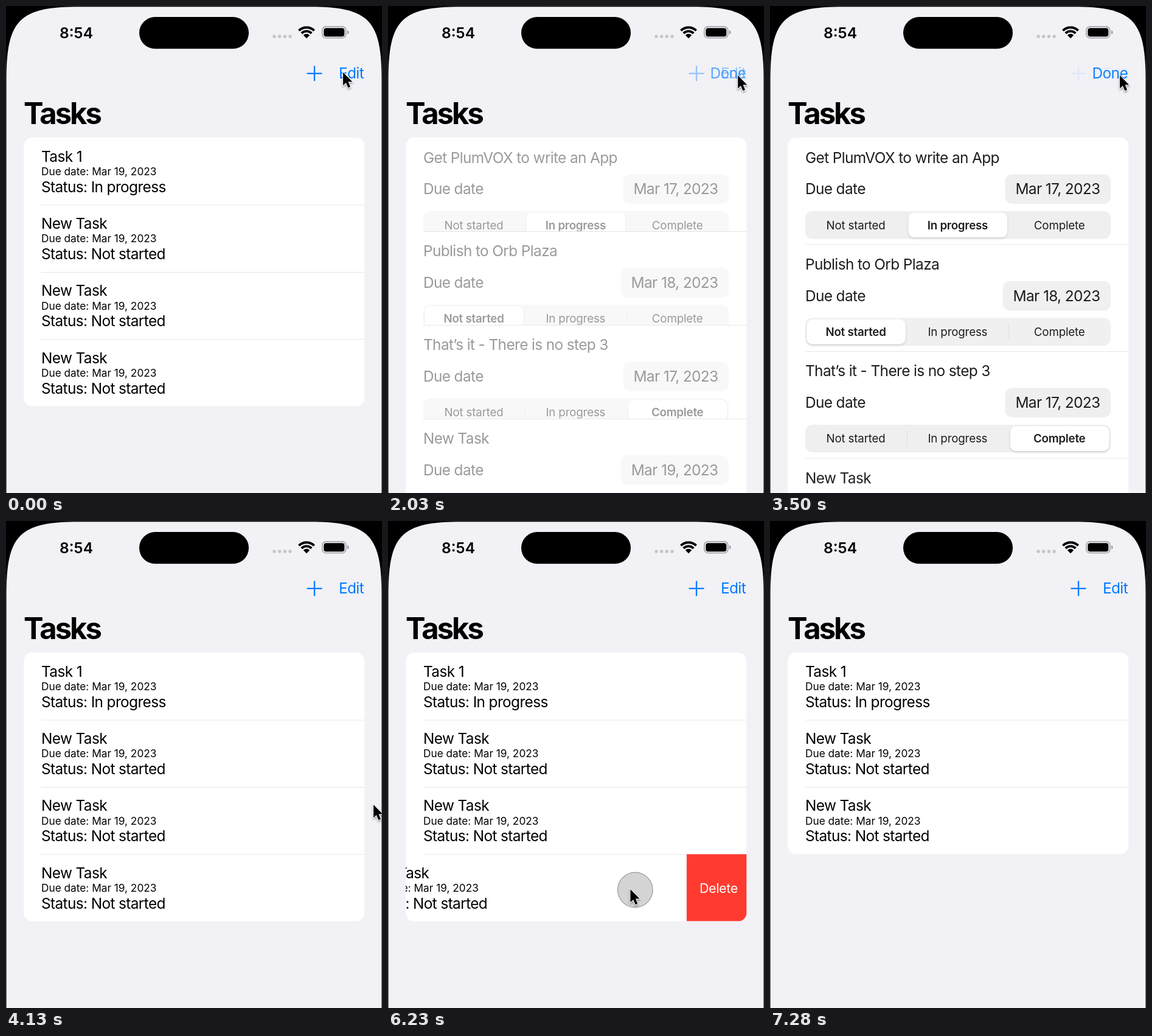
An HTML page for the animation above (8000 ms loop, 618 by 800 pixels).

```html
<!DOCTYPE html>
<html lang="en">
<head>
<meta charset="utf-8">
<title>Tasks</title>
<style>
  html, body { margin: 0; width: 100%; height: 100%; overflow: hidden; background: #000; }
  svg { display: block; }
  text { font-family: Inter, Roboto, sans-serif; fill: #000; white-space: pre; }
  .body { font-size: 24.4px; letter-spacing: -.62px; }
  .note { font-size: 17.25px; }
  .seg { font-size: 18.7px; letter-spacing: -.15px; text-anchor: middle; }
  .on { font-weight: 570; letter-spacing: -.2px; }
  .big { font-size: 48.9px; font-weight: 700; letter-spacing: -2.9px; }
  .time { font-size: 24.6px; font-weight: 600; }
  .blue { fill: #007aff; }
  .end { text-anchor: end; }
  .del { font-size: 21.4px; letter-spacing: -.3px; fill: #fff; }
</style>
</head>
<body>
<svg id="stage" width="618" height="800" viewBox="0 0 618 800"></svg>
<script>
const LOOP = 8000, TOP = 216, LEFT = 29, WIDTH = 560.5;
const SHORT = 110.4, TALL = 180.3;

const states = ['Not started', 'In progress', 'Complete'];
const tasks = [
  { title: 'Get PlumVOX to write an App', day: 17, sel: 1 },
  { title: 'Publish to Orb Plaza', day: 18, sel: 0 },
  { title: 'That’s it - There is no step 3', day: 17, sel: 2 },
  { title: 'New Task', day: 19, sel: 0 }
];

const text = (x, y, cls, s) => `<text x="${x}" y="${y}" class="${cls}">${s}</text>`;
const box = (x, y, w, h, r, fill, more = '') =>
  `<rect x="${x}" y="${y}" width="${w}" height="${h}" rx="${r}" fill="${fill}" ${more}/>`;

const readView = i => text(29, 39.5, 'body', i ? 'New Task' : 'Task 1')
  + text(29, 61.8, 'note', 'Due date: Mar 19, 2023')
  + text(29, 89.6, 'body', 'Status: ' + states[i ? 0 : 1]);

function picker(sel) {
  const w = 502 / 3;
  let out = box(29, 121, 502, 45.5, 11.5, '#eeeeef');
  for (const i of [1, 2])
    if (sel !== i && sel !== i - 1) out += box(28.5 + i * w, 130, 1, 27, 0, '#dadadd');
  out += box(31.4 + sel * w, 123.4, w - 5.2, 40.7, 9.5, '#fff', 'filter="url(#lift)"');
  states.forEach((s, i) => {
    out += text(29 + (i + .5) * w - .6, 150.6, i === sel ? 'seg on' : 'seg', s);
  });
  return out;
}

const editView = d => text(29, 41.6, 'body', d.title)
  + text(29, 93.4, 'body', 'Due date')
  + box(0, 60.5, 0, 48.5, 11.5, '#eeeeef', 'class="pill"')
  + text(513.5, 93.4, 'body end', `Mar ${d.day}, 2023`)
  + picker(d.sel);

const row = (d, i) => `<svg id="row${i}" x="${LEFT}" width="${WIDTH}">
  <g id="read${i}">${readView(i)}</g><g id="edit${i}">${editView(d)}</g>
  ${i ? box(29, 0, 532, 1, 0, '#e0e0e2') : ''}
  ${i === 3 ? `<g id="del">${box(0, 0, WIDTH, SHORT + 1, 0, '#ff3b30')}${text(21, 63.8, 'del', 'Delete')}</g>` : ''}
</svg>`;

// Each smooth corner is one cubic spanning `span`, pulled towards the corner by `pull`
function screenPath(span, pull) {
  const l = .6, r = 617.4, t = 1.2;
  return `M${l} 800V${t + span}C${l} ${t + pull} ${l + pull} ${t} ${l + span} ${t}`
    + `H${r - span}C${r - pull} ${t} ${r} ${t + pull} ${r} ${t + span}V800Z`;
}

function wifiArc(r) {
  const d = r * Math.SQRT1_2;
  return `<path d="M${494 - d} ${53 - d}A${r} ${r} 0 0 1 ${494 + d} ${53 - d}" fill="none" stroke="#000" stroke-width="3.9"/>`;
}

const dots = [0, 1, 2, 3].map(i => `<circle cx="${441 + i * 8.67}" cy="50" r="2.7" fill="#c5c5c9"/>`);
const statusBar = text(88, 52.8, 'time', '8:54')
  + box(219, 18, 180, 52.3, 26.1, '#000')
  + dots.join('') + wifiArc(17.8) + wifiArc(11.6)
  + '<path d="M494 53.2L488.8 48A7.4 7.4 0 0 1 499.2 48Z"/>'
  + box(519.8, 33.8, 39, 18.8, 6.3, 'none', 'stroke="#9c9ca0" stroke-width="1.5"')
  + box(522.3, 36.2, 34, 14, 4, '#000')
  + '<path d="M561 39.8Q563.6 41 563.6 43.2T561 46.6Z" fill="#9c9ca0"/>';

const stage = document.getElementById('stage');
stage.innerHTML = `<defs>
  <clipPath id="round"><rect id="clip" x="${LEFT}" y="${TOP}" width="${WIDTH}" rx="14.4"/></clipPath>
  <filter id="lift" x="-10%" y="-20%" width="120%" height="150%">
    <feDropShadow dx="0" dy="2" stdDeviation="2.2" flood-opacity=".16"/></filter>
  <filter id="shade" x="-50%" y="-50%" width="200%" height="200%">
    <feDropShadow dx="0" dy="2" stdDeviation="1.4" flood-opacity=".4"/></filter>
</defs>
<path d="${screenPath(121, 21)}" fill="#f1f1f6"/>
${statusBar}
<g id="barRead"><path d="M494.6 110.8H519.4M507 98.4V123.2" stroke="#007aff" stroke-width="2.3"/>
${text(588, 119.4, 'body blue end', 'Edit')}</g>
<g id="barEdit">${text(588, 119.4, 'body blue end', 'Done')}</g>
${text(29, 194, 'big', 'Tasks')}
<g clip-path="url(#round)"><rect id="card" x="${LEFT}" y="${TOP}" width="${WIDTH}" fill="#fff"/>${tasks.map(row).join('')}</g>
<circle id="touch" r="28.8" fill="#000" fill-opacity=".17" stroke="#000" stroke-opacity=".35" stroke-width="1.2"/>
<path id="cursor" d="M1 1V22.5L5.8 18L9.3 26.3L13 24.7L9.6 16.6H16.3Z" stroke="#fff" stroke-width="1.8" paint-order="stroke" filter="url(#shade)"/>`;

const el = Object.fromEntries([...stage.querySelectorAll('[id]')].map(e => [e.id, e]));

// Date pills hug their label
for (const pill of stage.querySelectorAll('.pill')) {
  const w = pill.nextElementSibling.getComputedTextLength() + 34.5;
  pill.setAttribute('width', w);
  pill.setAttribute('x', 531 - w);
}

const SWIPE = 5880;
const moves = [
  { from: 0, to: 1400, x: 574, y: 113 },
  { from: 3990, to: 4130, x: 603, y: 465 },
  { from: 4130, to: 4550, x: 602, y: 640 },
  { from: 4690, to: 5250, x: 548, y: 604 }
];
const presses = [[1580, 1740], [3250, 3420], [SWIPE, 6560]];

const ramp = (t, from, to) => {
  const p = Math.min(1, Math.max(0, (t - from) / (to - from)));
  return p * p * (3 - 2 * p);
};
const swipe = (t, power) => Math.pow(Math.max(0, t - SWIPE) / 350, power);

function pointer(t) {
  let x = 553, y = 108;
  for (const m of moves) {
    const p = ramp(t, m.from, m.to);
    x += (m.x - x) * p;
    y += (m.y - y) * p;
  }
  return [x - 150 * swipe(t, 1.5), y];
}

const fade = (e, v) => e.setAttribute('opacity', v.toFixed(3));
const move = (e, x, y) => e.setAttribute('transform', `translate(${x.toFixed(2)} ${y.toFixed(2)})`);

function draw(t) {
  const open = ramp(t, 1740, 2240) - ramp(t, 3420, 3920);
  const gone = ramp(t, 6590, 6930);
  const shift = -Math.min(WIDTH, 98 * swipe(t, 2.2));
  const h = SHORT + (TALL - SHORT) * open;

  tasks.forEach((d, i) => {
    el['row' + i].setAttribute('y', TOP + i * h);
    el['row' + i].setAttribute('height', i === 3 ? h * (1 - gone) : h);
    fade(el['read' + i], Math.max(0, 1 - open * 1.6));
    fade(el['edit' + i], Math.max(0, open * 1.6 - .6));
  });
  for (const e of [el.card, el.clip]) e.setAttribute('height', h * (4 - gone));
  move(el.read3, shift, 0);
  move(el.del, WIDTH + shift, 0);

  fade(el.barRead, 1 - open);
  fade(el.barEdit, open);

  const [x, y] = pointer(t);
  move(el.cursor, x, y);
  move(el.touch, pointer(t - 14)[0], y + 2);
  const held = presses.some(([a, b]) => t >= a && t < b);
  el.touch.setAttribute('visibility', held ? 'visible' : 'hidden');
}

const start = performance.now();
function tick(now) {
  draw(Math.max(0, now - start) % LOOP);
  requestAnimationFrame(tick);
}
draw(0);
requestAnimationFrame(tick);
</script>
</body>
</html>
```
